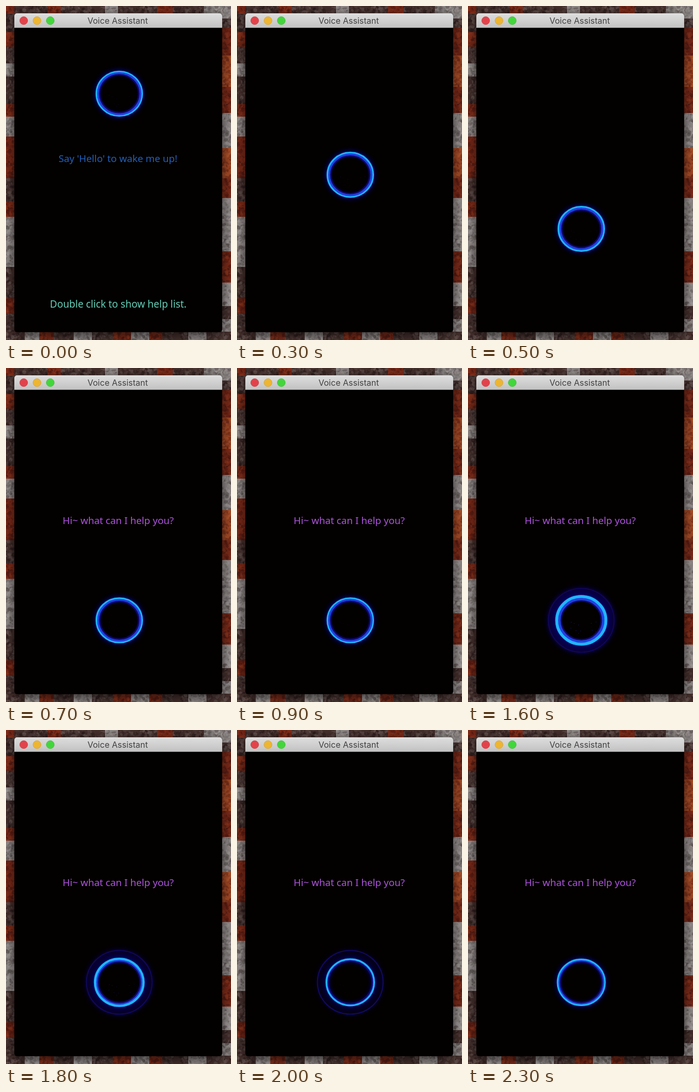
These frames come from a looping animation (432x640 px, 2400 ms). An HTML page with a canvas:

```html
<!DOCTYPE html>
<html lang="en">
<head>
<meta charset="utf-8">
<title>Voice Assistant</title>
<style>
html, body { margin: 0; width: 100%; height: 100%; overflow: hidden; background: #000; }
canvas, svg { position: absolute; left: 0; top: 0; width: 432px; height: 640px; display: block; }
text { text-anchor: middle; }
.say { font: 18.7px "Noto Sans", "Open Sans", sans-serif; }
.title { font: 16px Inter, Roboto, sans-serif; fill: #424242; }
ellipse { fill: none; }
</style>
</head>
<body>
<canvas id="scene" width="432" height="640"></canvas>
<svg viewBox="0 0 432 640">
  <defs>
    <linearGradient id="bar" x2="0" y2="1">
      <stop offset="0" stop-color="#dedede"/>
      <stop offset="1" stop-color="#c2c2c2"/>
    </linearGradient>
    <filter id="soft" x="-30%" y="-30%" width="160%" height="160%"><feGaussianBlur stdDeviation="4"/></filter>
    <filter id="fine" x="-10%" y="-10%" width="120%" height="120%"><feGaussianBlur stdDeviation=".5"/></filter>
  </defs>
  <rect x="16" y="14" width="399" height="611" rx="5" fill="#030000"/>
  <path d="M16 41V19a5 5 0 0 1 5-5H410a5 5 0 0 1 5 5V41Z" fill="url(#bar)"/>
  <path d="M16 41.5H415" stroke="#8f8f8f"/>
  <g stroke-width=".8">
    <circle cx="34" cy="28" r="7.6" fill="#e2434b" stroke="#cc3a42"/>
    <circle cx="59.5" cy="28" r="7.6" fill="#edb531" stroke="#d6a02a"/>
    <circle cx="85" cy="28" r="7.6" fill="#43d63c" stroke="#38bd33"/>
  </g>
  <text class="title" x="214.5" y="34">Voice Assistant</text>
  <text class="say" id="wake" x="215" y="299" fill="#2160b8">Say 'Hello' to wake me up!</text>
  <text class="say" id="help" x="215.5" y="578" fill="#62d0b8" style="font-size:19px">Double click to show help list.</text>
  <text class="say" id="reply" x="215.5" y="299" fill="#ae54dc">Hi~ what can I help you?</text>
  <g id="orb">
    <ellipse id="glow" stroke="#10066a" stroke-width="18" filter="url(#soft)"/>
    <ellipse id="halo" stroke="#16108a" stroke-width="2.2" filter="url(#fine)"/>
    <ellipse id="aura" stroke="#0a0a9c" stroke-width="8" filter="url(#soft)"/>
    <ellipse id="deep" stroke="#140b78" stroke-width="3" filter="url(#fine)"/>
    <ellipse id="blue" stroke="#2340e0"/>
    <ellipse id="cyan" stroke="#20b6ff"/>
    <g id="dust" fill="#1c22b0"></g>
  </g>
</svg>
<script>
const $ = id => document.getElementById(id);
const LOOP = 2400, STEP = 100, ASPECT = 0.968;

function random(seed) {
  return () => (seed = (seed * 16807) % 2147483647) / 2147483647;
}

// Blurry canyon wallpaper visible around the window
const TONES = {
  snow: ['#938c8b', '#aaa4a3', '#77706f', '#5c5251'],
  rock: ['#7e2c1a', '#95391f', '#611e13', '#4c1a13'],
  clay: ['#a44a26', '#b85a30', '#84351d', '#6f2918'],
  dark: ['#45302d', '#564340', '#2c1d1c', '#6b5a57']
};
const rnd = random(71);
const pen = $('scene').getContext('2d');

function patch(x, y, w, h, tone) {
  const colors = TONES[tone];
  pen.save();
  pen.beginPath();
  pen.rect(x, y, w, h);
  pen.clip();
  pen.fillStyle = colors[0];
  pen.fillRect(x, y, w, h);
  for (let i = w * h / 14; i > 0; i--) {
    pen.fillStyle = colors[Math.floor(rnd() * 4)];
    pen.globalAlpha = 0.35 + rnd() * 0.4;
    pen.beginPath();
    pen.ellipse(x + rnd() * w, y + rnd() * h, 1 + rnd() * 4, 1 + rnd() * 3, rnd() * 3, 0, 7);
    pen.fill();
  }
  pen.restore();
}

function strip(spec, place) {
  let from = 0;
  for (const part of spec.split(' ')) {
    const [tone, to] = part.split(':');
    place(from, to - from, tone);
    from = +to;
  }
}

strip('dark:50 rock:78 dark:110 snow:135 dark:188 rock:212 snow:250 rock:330 dark:375 rock:404 snow:500 dark:560 rock:590 dark:640',
  (y, h, tone) => patch(0, y, 17, h, tone));
strip('snow:24 dark:42 rock:95 clay:155 rock:205 snow:272 clay:330 rock:368 snow:470 rock:530 snow:575 dark:600 snow:640',
  (y, h, tone) => patch(414, y, 18, h, tone));
strip('rock:16 dark:80 rock:105 dark:190 snow:215 dark:290 rock:320 dark:380 snow:432',
  (x, w, tone) => patch(x, 0, w, 15, tone));
strip('dark:36 snow:64 rock:92 dark:130 snow:165 dark:205 rock:240 snow:275 rock:300 dark:350 snow:385 dark:432',
  (x, w, tone) => patch(x, 624, w, 16, tone));

pen.shadowColor = 'rgba(0,0,0,.75)';
pen.shadowBlur = 24;
pen.shadowOffsetY = 5;
pen.fillRect(17, 15, 397, 609);

const spark = random(19);
for (let i = 0; i < 12; i++) {
  const dot = document.createElementNS('http://www.w3.org/2000/svg', 'circle');
  dot.setAttribute('cx', -20 + spark() * 52);
  dot.setAttribute('cy', 2 + spark() * 26);
  dot.setAttribute('r', 0.6);
  $('dust').append(dot);
}

// time, outer radius, cyan width, blue width, halo, glow, dust
const POSES = [
  [0, 45.5, 2.8, 4, 0, 0, .3],
  [500, 45.5, 3.2, 4, 0, 0, .3],
  [900, 45.5, 2.8, 4, 0, 0, .2],
  [1200, 48.5, 5, 5, 0, 0, .7],
  [1600, 50, 5.5, 5, .45, .6, .9],
  [2000, 47.5, 3.2, 1.2, .65, .25, .2],
  [2300, 47, 3, 2.8, 0, 0, 0]
];

function poseAt(t) {
  const i = POSES.findIndex(p => p[0] >= t);
  if (i < 1) return POSES[i < 0 ? POSES.length - 1 : 0];
  const a = POSES[i - 1], b = POSES[i];
  const k = (t - a[0]) / (b[0] - a[0]);
  return a.map((v, n) => v + (b[n] - v) * k);
}

function ring(id, radius, width, opacity = 1) {
  const el = $(id);
  el.setAttribute('rx', radius);
  el.setAttribute('ry', radius * ASPECT);
  if (width) el.setAttribute('stroke-width', width);
  el.setAttribute('opacity', opacity);
}

function draw(t) {
  const [, outer, cyan, blue, halo, glow, dust] = poseAt(t);
  const y = Math.min(168 + t * 0.518, 483.5);
  $('orb').setAttribute('transform', `translate(217.5 ${y})`);
  ring('glow', 57, 0, glow);
  ring('halo', 63, 0, halo);
  ring('aura', outer - 2, 0, .75);
  ring('cyan', outer - cyan / 2, cyan);
  ring('blue', outer - cyan - blue / 2 + .3, blue);
  ring('deep', outer - cyan - blue - 1, 0, .85);
  $('dust').setAttribute('opacity', dust);
  const show = (id, on) => $(id).setAttribute('visibility', on ? 'visible' : 'hidden');
  show('wake', t < 100);
  show('help', t < 100);
  show('reply', t >= 700);
}

function tick() {
  const t = performance.now() % LOOP;
  draw(Math.floor(t / STEP) * STEP);
  requestAnimationFrame(tick);
}
tick();
</script>
</body>
</html>
```
